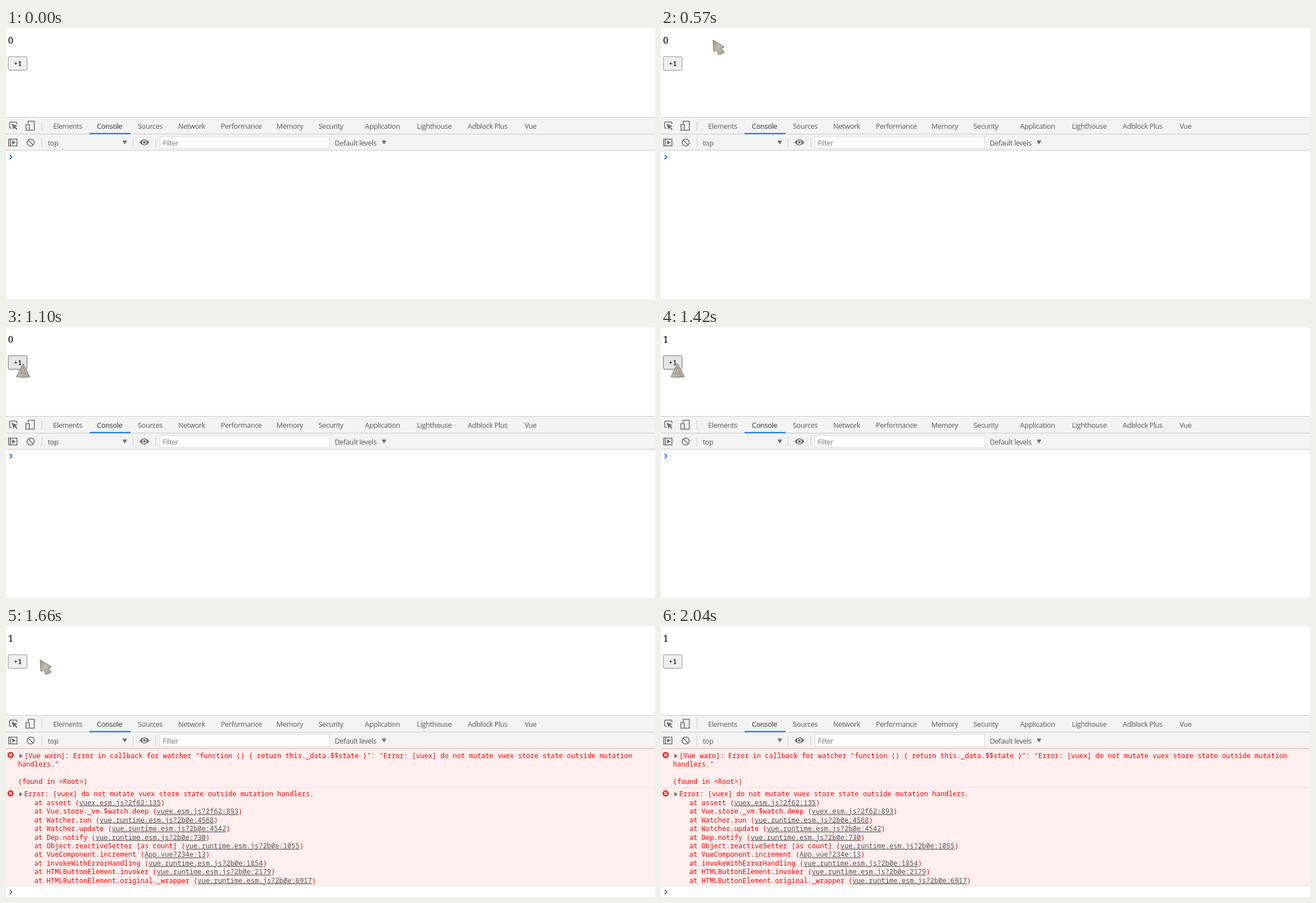
An HTML page that plays this animation: 1157 by 484 pixels, repeating every 2820 ms.

```html
<!DOCTYPE html>
<html lang="en">
<head>
<meta charset="utf-8">
<title>Store state counter</title>
<style>
  html, body { margin: 0; width: 100%; height: 100%; overflow: hidden; background: #fff; }
  svg { display: block; width: 100vw; height: 100vh; }
  text { white-space: pre; }
  .ui { font: 12.8px "Open Sans", "Noto Sans", sans-serif; letter-spacing: -.4px; fill: #5a5a5a; }
  .serif { font-family: "Noto Serif", serif; fill: #000; }
  .log { font: 12.13px "Noto Sans Mono", "DejaVu Sans Mono", monospace; fill: #f00; }
  .link { fill: #545454; text-decoration: underline; }
  .icon { fill: none; stroke: #6e6e6e; stroke-width: 1.6; }
  .solid { fill: #6e6e6e; }
  .rule { stroke: #cacaca; }
  #button { fill: #efefef; stroke: #8d8d8d; }
  #button.hover { fill: #e5e5e5; stroke: #686868; }
  #button.press { fill: #f5f5f5; stroke: #8d8d8d; }
  .stone { stroke: #857d73; stroke-width: 1.1; stroke-linejoin: round; }
</style>
</head>
<body>
<svg viewBox="0 0 1157 484" preserveAspectRatio="none">
  <defs>
    <linearGradient id="rock" x2="1" y2="1">
      <stop stop-color="#9c948a"/>
      <stop offset=".45" stop-color="#c1b9ad"/>
      <stop offset="1" stop-color="#aba398"/>
    </linearGradient>
  </defs>

  <text id="count" class="serif" x="3.8" y="28" font-size="16.5">0</text>
  <rect id="button" x="4" y="51.2" width="33.5" height="24.3" rx="2"/>
  <text class="serif" x="13.5" y="68" font-size="13.4">+1</text>

  <rect y="159" width="1157" height="60" fill="#f3f3f3"/>
  <path class="rule" d="M0 159.5H1157M0 189.5H1157M0 218.5H1157M64 166V183M64 196V213M226.500 196V213M267 196V213"/>
  <rect x="149" y="187.500" width="73" height="2.2" fill="#1a73e8"/>
  <g id="tabs" class="ui"></g>

  <!-- toolbar icons -->
  <path class="icon" d="M10 179H8Q6.500 179 6.500 177.500V169.500Q6.500 168 8 168H18Q19.500 168 19.500 169.500V172"/>
  <path class="solid" d="M10 171L20.500 175L16.700 176.700L20.500 180.500L19 182L15.200 178.200L13.500 181.500Z"/>
  <path class="icon" d="M39.500 171V166.500H50.500V182.500H42M35.500 172.500H41.500V182.500H35.500Z"/>
  <path class="icon" d="M4.800 198.500H19.500V210.500H4.800ZM8 198.500V210.500"/>
  <path class="solid" d="M11 200.700L17.500 204.500L11 208.300Z"/>
  <circle class="icon" cx="44" cy="204.500" r="6.300"/>
  <path class="icon" d="M39.500 200L48.500 209"/>
  <path class="solid" d="M238 204.300Q246.500 193.500 255.500 204.300Q246.500 215 238 204.300Z"/>
  <circle cx="246.700" cy="204.300" r="3.100" fill="#6e6e6e" stroke="#f3f3f3" stroke-width="1.600"/>
  <path class="solid" d="M207.500 201H216L211.750 208ZM669.700 201H678.200L673.950 208Z"/>

  <rect x="274.500" y="193.500" width="302" height="21.500" fill="#fff" stroke="#dadada"/>
  <text class="ui" x="74.500" y="209.500">top</text>
  <text class="ui" x="279.500" y="209.800" style="fill:#777">Filter</text>
  <text class="ui" x="586" y="209.500">Default levels</text>

  <g id="errors">
    <rect y="219" width="1157" height="244.500" fill="#ffefee"/>
    <path d="M0 219.500H1157M0 288.500H1157M0 463.500H1157" stroke="#ffd6d6"/>
  </g>
  <path id="prompt" fill="none" stroke-width="1.800" d="M6.500 -4L10.500 0L6.500 4"/>

  <path id="arrow" class="stone" fill="url(#rock)" d="M.8 .6L20.500 12.500L15.500 16.200L20.500 22Q16 26 10.500 26.200L7.500 18.500L2 21Z"/>
  <g id="pointer">
    <path class="stone" fill="url(#rock)" d="M12.500 .6L24.500 24L13 25.300L.6 24Z"/>
    <path d="M12.500 6L8 19L12.700 16L17.500 19Z" fill="none" stroke="#918a80"/>
    <path d="M12.700 16V24" stroke="#a49c91"/>
  </g>
</svg>
<script>
const LOOP = 2820;
const byId = id => document.getElementById(id);

function add(parent, name, attrs, content = "") {
  const node = document.createElementNS("http://www.w3.org/2000/svg", name);
  for (const key in attrs) node.setAttribute(key, attrs[key]);
  node.textContent = content;
  parent.append(node);
  return node;
}

const tabs = [["Elements", 84], ["Console", 162], ["Sources", 235], ["Network", 307],
  ["Performance", 383], ["Memory", 482], ["Security", 557], ["Application", 640],
  ["Lighthouse", 732.5], ["Adblock Plus", 823], ["Vue", 924.5]];
for (const [label, x] of tabs) {
  const tab = add(byId("tabs"), "text", { x, y: 179.5 }, label);
  if (label === "Console") tab.style.fill = "#333";
}

const errors = byId("errors");
const log = (x, y, line) => add(errors, "text", { class: "log", x, y }, line);

for (const y of [230.5, 299]) {
  add(errors, "circle", { cx: 8.2, cy: y, r: 5.7, fill: "#e53935" });
  add(errors, "path", { d: `M6 ${y - 2.2}l4.4 4.4m0-4.4l-4.400 4.400`, stroke: "#fff", "stroke-width": 1.3 });
  add(errors, "path", { d: `M24 ${y - 2.5}l5.500 4l-5.500 4z`, fill: "#6e6e6e" });
}
log(32.5, 236, '[Vue warn]: Error in callback for watcher "function () { return this._data.$$state }": "Error: [vuex] do not mutate vuex store state outside mutation');
log(21.5, 251.3, 'handlers."');
log(21.5, 282.3, "(found in <Root>)");
log(32.5, 304.3, "Error: [vuex] do not mutate vuex store state outside mutation handlers.");

const trace = [
  ["assert", "vuex.esm.js?2f62:135"],
  ["Vue.store._vm.$watch.deep", "vuex.esm.js?2f62:893"],
  ["Watcher.run", "vue.runtime.esm.js?2b0e:4568"],
  ["Watcher.update", "vue.runtime.esm.js?2b0e:4542"],
  ["Dep.notify", "vue.runtime.esm.js?2b0e:730"],
  ["Object.reactiveSetter [as count]", "vue.runtime.esm.js?2b0e:1055"],
  ["VueComponent.increment", "App.vue?234e:13"],
  ["invokeWithErrorHandling", "vue.runtime.esm.js?2b0e:1854"],
  ["HTMLButtonElement.invoker", "vue.runtime.esm.js?2b0e:2179"],
  ["HTMLButtonElement.original._wrapper", "vue.runtime.esm.js?2b0e:6917"],
];
trace.forEach(([call, file], i) => {
  const row = log(50.5, 319.8 + i * 15.44, `at ${call} (`);
  add(row, "tspan", { class: "link" }, file);
  row.append(")");
});

const cursorSteps = [
  [0, 0, 0, ""],
  [100, 838, 417, "arrow"], [180, 735, 270, "arrow"], [260, 610, 110, "arrow"],
  [340, 500, 0, "arrow"], [420, 400, 50, "arrow"], [490, 297, 86, "arrow"], [570, 92, 21, "arrow"],
  [650, 88, 28, "arrow"], [720, 75, 40, "arrow"], [800, 55, 54, "arrow"], [870, 40, 62, "arrow"],
  [950, 37, 63, "arrow"], [1030, 19, 64, "pointer"], [1100, 18, 65, "pointer"], [1190, 17, 65, "pointer"],
  [1570, 20, 65, "pointer"], [1650, 60, 60, "arrow"], [1730, 264, 66, "arrow"], [1810, 435, 107, "arrow"],
  [1900, 660, 235, "arrow"], [1970, 938, 391, "arrow"], [2040, 0, 0, ""],
];

function draw(t) {
  const [, x, y, shape] = cursorSteps.findLast(step => step[0] <= t);
  for (const id of ["arrow", "pointer"]) {
    byId(id).setAttribute("transform", `translate(${x} ${y})`);
    byId(id).style.display = id === shape ? "" : "none";
  }
  const pressed = t >= 1350 && t < 1420;
  byId("button").setAttribute("class", pressed ? "press" : shape === "pointer" ? "hover" : "");
  byId("count").textContent = t < 1420 ? "0" : "1";

  const failed = t >= 1510;
  errors.style.display = failed ? "" : "none";
  byId("prompt").setAttribute("transform", `translate(0 ${failed ? 475.5 : 230.5})`);
  byId("prompt").setAttribute("stroke", failed ? "#6e6e6e" : "#1a73e8");
}

const start = performance.now();
function tick() {
  draw((performance.now() - start) % LOOP);
  requestAnimationFrame(tick);
}
tick();
</script>
</body>
</html>
```
